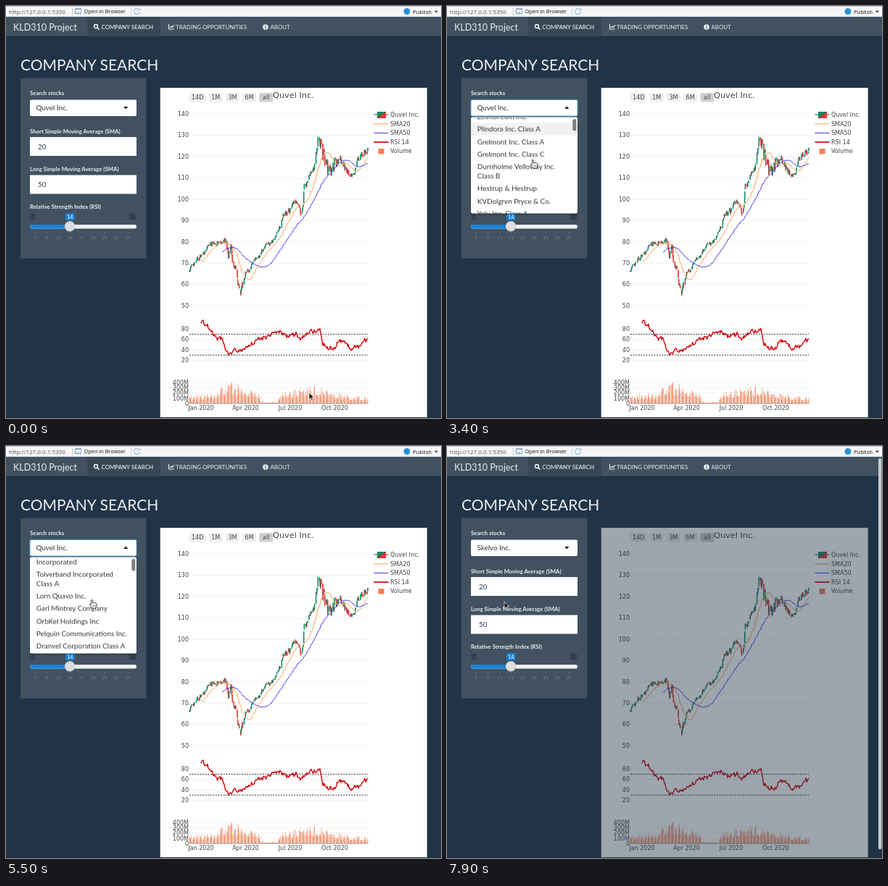
Write an HTML page that moves like this. It is 600x569 px and loops after 8 s.

```html
<!DOCTYPE html>
<html lang="en">
<head>
<meta charset="utf-8">
<title>Company search</title>
<style>
html, body { margin: 0; width: 100%; height: 100%; overflow: hidden; background: #213447; }
svg { display: block; width: 600px; height: 569px; }
text { font-family: Lato, sans-serif; white-space: pre; }
.bar text { font-family: "Open Sans", sans-serif; }
.chart text { font-family: "DejaVu Sans", sans-serif; fill: #444; }

.open, .shut, .before, .after, .arrow, .hand, .hover, .thumb, .chart, .page { animation: 8s step-end infinite; }
.open { animation-name: open; }
.shut { animation-name: shut; }
.before { animation-name: before; }
.after { animation-name: after; }
.arrow { animation-name: arrow; }
.hand { animation-name: hand; }
.hover { animation-name: hover; }
.thumb { animation-name: thumb; }
.page { animation-name: page; }
.chart { animation-name: recalc; }
.caret { animation: blink 1s step-end infinite; }
.list { animation: scroll 8s linear infinite; }
.pointer { animation: move 8s ease-in-out infinite; }

@keyframes open { 0%, 90%, 100% { opacity: 0 } 18.75% { opacity: 1 } }
@keyframes shut { 0%, 90%, 100% { opacity: 1 } 18.75% { opacity: 0 } }
@keyframes before { 0% { opacity: 1 } 90%, 100% { opacity: 0 } }
@keyframes after { 0% { opacity: 0 } 90%, 100% { opacity: 1 } }
@keyframes arrow { 0%, 93%, 100% { opacity: 1 } 16% { opacity: 0 } }
@keyframes hand { 0%, 93%, 100% { opacity: 0 } 16% { opacity: 1 } }
@keyframes thumb { 0%, 86%, 100% { opacity: 0 } 37.5% { opacity: 1 } }
@keyframes page { 0% { opacity: 0 } 96%, 100% { opacity: 1 } }
@keyframes recalc { 0%, 97.5% { opacity: 1 } 98.75%, 100% { opacity: .56 } }
@keyframes blink { 0%, 70%, 100% { opacity: 1 } 20% { opacity: 0 } }
@keyframes hover {
  0% { transform: translateY(0) }
  28.75% { transform: translateY(17.2px) }
  33.75% { transform: translateY(34.4px) }
  36.25% { transform: translateY(51.6px) }
  81.25% { transform: translateY(366.4px) }
  85%, 100% { transform: translateY(383.6px) }
}
@keyframes scroll {
  0%, 37% { transform: translateY(0) }
  48.75% { transform: translateY(-101.7px) }
  61.25% { transform: translateY(-183.8px) }
  78.75%, 100% { transform: translateY(-313.4px) }
}
@keyframes move {
  0%, 1% { transform: translate(418px, 534px) }
  11.25%, 12.5% { transform: translate(131px, 149px) }
  16.25%, 19% { transform: translate(130px, 143px) }
  25% { transform: translate(128px, 168px) }
  32.5% { transform: translate(126px, 185px) }
  37.5%, 80% { transform: translate(118.5px, 212px) }
  86%, 90% { transform: translate(118px, 233px) }
  97.5%, 100% { transform: translate(79px, 215px) }
}
</style>
</head>
<body>
<svg id="stage" viewBox="0 0 600 569" xmlns="http://www.w3.org/2000/svg"></svg>
<script>
const START = "Quvel Inc.", CHOICE = "Skelvo Inc.";
const STOCKS = [
  START, "Tarnovell Corporation", "Zelmor.com Inc.", "Plindora Inc. Class A",
  "Grelmont Inc. Class A", "Grelmont Inc. Class C", "Durnholme Velloway Inc.|Class B",
  "Hestrup & Hestrup", "KVDolgren Pryce & Co.", "Yelu Inc. Class A",
  "Wendrel & Fosk Company", "ZORELK Corporation", "BrinderWell Group|Incorporated",
  "Tolverband Incorporated|Class A", "Lorn Quavo Inc.", "Garl Mintrey Company",
  "OrbKel Holdings Inc", "Pelquin Communications Inc.", "Dranvel Corporation Class A",
  "Uveko Inc.", CHOICE, "Jorvane Inc.", "Bank of Tremoria Corp", "Krelm Corporation"
];

// Turning points as x, value; seeded noise fills in the daily detail
const PRICE = [253,67, 285,80, 302,80, 306,71, 311,74, 324,57, 335,66, 356,77, 369,80, 382,92,
  400,98, 406,93, 410,95, 411,106, 425,115, 434,132, 438,118, 450,109, 460,121, 475,110, 485,117, 499,123];
const RSI = [269,94, 277,89, 289,62, 298,60, 307,31, 315,43, 325,38, 342,57, 366,69, 378,75,
  386,67, 400,71, 407,58, 412,70, 433,79, 437,50, 452,41, 460,60, 475,43, 487,46, 499,61];
const VOLUME = [253,120, 290,150, 306,330, 350,150, 351,26, 375,26, 376,140, 412,260, 435,230, 470,130, 499,95];

let seed = 7;
const rand = () => {
  seed = (seed * 16807) % 2147483647;
  return seed / 2147483647;
};
// Noise that drifts back to zero
const drift = keep => {
  let v = 0;
  return amp => v = v * keep + (rand() - .5) * amp;
};
const at = (pts, x) => {
  for (let i = 2; i < pts.length; i += 2) {
    if (x <= pts[i]) {
      const k = (x - pts[i - 2]) / (pts[i] - pts[i - 2]);
      return pts[i - 1] + k * (pts[i + 1] - pts[i - 1]);
    }
  }
  return pts[pts.length - 1];
};
const esc = s => s.replace(/&/g, "&amp;");
const text = (x, y, size, str, fill = "#eceff1", more = "") =>
  `<text x="${x}" y="${y}" font-size="${size}" fill="${fill}" ${more}>${esc(str)}</text>`;
const rect = (x, y, w, h, fill, more = "") =>
  `<rect x="${x}" y="${y}" width="${w}" height="${h}" fill="${fill}" ${more}/>`;
const path = (d, stroke, width = 1, more = "") =>
  `<path d="${d}" fill="none" stroke="${stroke}" stroke-width="${width}" ${more}/>`;
const shape = (d, fill, more = "") => `<path d="${d}" fill="${fill}" ${more}/>`;
const group = (name, body, more = "") => `<g class="${name}" ${more}>${body}</g>`;
const line = pts => "M" + pts.map(p => p.map(n => n.toFixed(1))).join("L");
const bar = (x, top, bottom) => `M${x.toFixed(1)} ${top.toFixed(1)}V${bottom.toFixed(1)}`;
const MID = 'text-anchor="middle"', END = 'text-anchor="end"', BOLD = 'font-weight="700"';

function toolbar() {
  return group("bar",
    rect(0, 0, 600, 15, "#f5f6f7") + rect(0, 0, 600, 1, "#b9bcbf") + rect(0, 14, 600, 1, "#d4d8dc") +
    text(4, 10.5, 8, "http://127.0.0.1:5350", "#555") +
    path("M91.5 2V13M172.5 2V13", "#cfd3d6") +
    rect(95.5, 3.5, 8, 7, "#fff", 'stroke="#8d9aa8"') + rect(95, 3, 9, 2, "#8fb0d4") +
    path("M97 11L101 7.5", "#5b8fc7") +
    text(107.5, 10.3, 7.4, "Open in Browser", "#111") +
    path("M184 5.5A4 4 0 1 0 184.5 8.5", "#9fbdd6", 1.2) + path("M185 3V6H182", "#9fbdd6") +
    '<circle cx="553" cy="7.5" r="4.5" fill="#2b8fd6"/>' +
    text(561, 10.5, 7.6, "Publish", "#111") + shape("M591 6.5H596L593.5 9.5Z", "#444"));
}

function navbar() {
  return rect(0, 15, 600, 26.5, "#41515f") + rect(112, 15, 101, 26.5, "#384755") +
    text(10, 33.5, 12.5, "KLD310 Project") +
    '<circle cx="124" cy="28" r="2.5" fill="none" stroke="#fff" stroke-width="1.3"/>' +
    path("M126 30L128.5 32.5", "#fff", 1.5) +
    text(131.5, 31.8, 7.9, "COMPANY SEARCH", "#fff") +
    path("M224.5 25V32H232", "#eceff1", 1.1) + path("M226 30L228 28L229.5 29.5L232 26", "#eceff1", 1.2) +
    text(234, 31.8, 7.9, "TRADING OPPORTUNITIES") +
    '<circle cx="358" cy="29" r="3.8" fill="#eceff1"/>' + rect(357.4, 28.3, 1.3, 3, "#41515f") +
    rect(357.4, 26.3, 1.3, 1.3, "#41515f") +
    text(364.5, 31.8, 7.9, "ABOUT") +
    text(20, 89, 21, "COMPANY SEARCH");
}

function slider() {
  const dim = "#75828e", badge = "#394754", blue = "#1783d8";
  let out = rect(33, 286, 8, 10, badge, 'rx="1.5"') + text(37, 293.5, 6.6, "5", "#1f2b36", MID) +
    rect(169, 286, 11, 10, badge, 'rx="1.5"') + text(174.5, 293.5, 6.6, "30", "#1f2b36", MID) +
    rect(82, 286, 12.5, 10, blue, 'rx="1.5"') + text(88.2, 293.7, 7.2, "14", "#fff", MID) +
    rect(33, 302, 147, 5.5, "#f1f1f1", 'rx="2.7"') + rect(33, 302, 54, 5.5, blue, 'rx="2.7"');
  for (let v = 5; v <= 30; v++) {
    const x = (40.5 + (v - 5) * 5.32).toFixed(1), major = v % 3 == 2;
    out += rect(x, 311, .5, major ? 4 : 2, dim);
    if (major) out += text(x, 321.5, 6, String(v), dim, MID);
  }
  return out + '<circle cx="88" cy="304.3" r="7" fill="#dedede" stroke="#b5babf" stroke-width=".6"/>';
}

function panel() {
  const label = (y, s) => text(33, y, 7.75, s, "#eceff1", BOLD);
  const input = (y, v) => rect(33, y, 147, 26, "#fff") + text(44, y + 16.6, 9.9, v, "#2b3e50");
  return rect(20, 99.5, 173.5, 249, "#41515f") +
    label(123, "Search stocks") + rect(33, 129.5, 147, 22.5, "#fff", 'rx="2"') +
    group("before", text(41.5, 144.3, 9.9, START, "#333")) +
    group("after", text(41.5, 144.3, 9.9, CHOICE, "#333")) +
    group("shut", shape("M162 139H168.5L165.2 142.6Z", "#222")) +
    label(175.5, "Short Simple Moving Average (SMA)") + input(181, "20") +
    label(227.5, "Long Simple Moving Average (SMA)") + input(233.5, "50") +
    label(279.5, "Relative Strength Index (RSI)") + slider();
}

function dropdown() {
  let y = 157.5, rows = "";
  for (const name of STOCKS) {
    const parts = name.split("|");
    parts.forEach((part, i) => {
      rows += text(41.8, (y + 12.2 + i * 13.2).toFixed(1), 9.9, part, "#333");
    });
    y += 4 + parts.length * 13.2;
  }
  const hover = rect(33, 157.5, 147, 17.2, "#f2f2f2", 'class="hover"');
  return '<clipPath id="box"><rect x="33" y="154.3" width="147" height="132" rx="2"/></clipPath>' +
    group("open",
      rect(33, 129.5, 147, 22.5, "none", 'rx="2" stroke="#5ba3dc"') +
      shape("M162 142H168.5L165.2 138.4Z", "#222") +
      rect(85.6, 135, .8, 11.5, "#222", 'class="caret"') +
      rect(32.5, 154.5, 148, 134, "#000", 'rx="3" opacity=".22"') +
      rect(33, 153.5, 147, 133, "#fff", 'rx="2"') +
      group("", group("list", hover + rows), 'clip-path="url(#box)"') +
      group("thumb", rect(173.3, 156, 5, 16.5, "#7f7f7f", 'rx="2.5"')));
}

function chart() {
  const green = "#148a66", red = "#e23a35", orange = "#f7a04b", blue = "#3c35ea";
  const crimson = "#d0040c", coral = "#f47f55";
  const py = v => 149 + (140 - v) * 2.944;
  const ry = v => 446 + (80 - v) * .7217;
  const vy = v => 549 - v * .0735;
  let out = rect(212.7, 113, 368, 455, "#fff");

  let left = 253;
  for (const s of ["14D", "1M", "3M", "6M", "all"]) {
    const w = s == "14D" ? 22.5 : 19;
    out += rect(left, 120, w, 12.5, s == "all" ? "#d0d0d0" : "#eee", 'rx="2"') +
      text(left + w / 2, 129.2, 8, s, "#444", MID);
    left += w + 4.2;
  }
  out += text(368, 127, 11.3, START);

  const axis = (from, to, step, scale, unit = "") => {
    for (let v = from; v <= to; v += step) {
      const y = scale(v);
      out += path(`M253 ${y.toFixed(1)}H499`, "#e2e2e2", .8, 'stroke-dasharray="2 1.5"') +
        text(252, (y + 2.9).toFixed(1), 8, v ? v + unit : "0", "#444", END);
    }
  };
  axis(50, 140, 10, py);
  axis(20, 80, 20, ry);
  axis(0, 400, 100, vy, "M");
  ["Jan", "Apr", "Jul", "Oct"].forEach((m, i) => {
    out += text(269 + i * 61.5, 558, 8, m + " 2020", "#444", MID);
  });

  // Trading days: five bars, then a weekend gap
  const walk = drift(.65), wobble = drift(.5);
  let last = 67, bars = "", candles = "";
  const days = Array.from({ length: 262 }, (_, i) => {
    const x = 253 + (Math.floor(i / 5) * 7 + i % 5) * .674;
    const wild = (x > 302 && x < 333) || (x > 430 && x < 456);
    const close = at(PRICE, x) * (1 + walk(wild ? .08 : .03));
    const open = last + (close - last) * rand() * .5;
    const tail = close * (wild ? .014 : .006);
    const hue = close > open ? green : red;
    const top = Math.max(open, close), low = Math.min(open, close);
    // A jump over the weekend leaves a gap instead of a long body
    const base = top - low > close * .07 ? top - tail : low;
    candles += path(bar(x, py(top + tail * rand()), py(base - tail * rand())), hue, .8) +
      path(bar(x, py(top + tail * .3), py(base - tail * .3)), hue, 1.5);
    bars += bar(x, 549, vy(at(VOLUME, x) * (.55 + .8 * rand() ** 2)));
    last = close;
    return { x, close, rsi: at(RSI, x) + wobble(8) };
  });
  const sma = n => line(days.slice(n - 1).map((d, i) =>
    [d.x, py(days.slice(i, i + n).reduce((sum, e) => sum + e.close, 0) / n)]));
  const rsi = line(days.filter(d => d.x >= 269).map(d => [d.x, ry(d.rsi)]));

  out += path(bars, coral, .65) + path("M253 549H499", "#777", .6) + candles +
    path(sma(20), orange) + path(sma(50), blue) +
    path(`M253 ${ry(70)}H499M253 ${ry(30)}H499`, "#222", 1, 'stroke-dasharray="2 1.6"') +
    path(rsi, crimson, 1.4, 'stroke-linejoin="round"');

  ["", orange, blue, crimson].forEach((hue, i) => {
    if (hue) out += path(`M507.5 ${150.2 + i * 12.6}H527.5`, hue, hue == crimson ? 1.7 : 1);
  });
  [START, "SMA20", "SMA50", "RSI 14", "Volume"].forEach((s, i) => {
    out += text(530, 153 + i * 12.6, 8, s);
  });
  return group("chart", out +
    path("M507.5 150H513", green, 1.3) + path("M523 150H527.5", red, 1.3) +
    shape("M512 146H524L512 155Z", green) + shape("M524 146V155H512Z", red) +
    path("M512 155L524 146", "#333", .8) + rect(513.5, 197, 8, 7.5, coral));
}

function pointer() {
  const arrow = shape("M0 0V9.3L2.2 7.3L3.8 11L5.4 10.3L3.8 6.8H6.7Z", "#111",
    'stroke="#fff" stroke-width=".7" stroke-linejoin="round"');
  const hand = shape("M-1 1Q0 -.6 1 1V4.6L4.6 4.7Q6.8 5.2 6.6 7Q6.6 9.5 5.4 12H.3" +
    "Q-1.6 9.3 -3.2 7.4Q-3 5.8 -1 7.2Z", "#fff",
    'stroke="#222" stroke-width=".9" stroke-linejoin="round"') +
    path("M1.4 7.5V10M3 7.5V10M4.6 7.5V10", "#444", .6);
  return group("pointer", group("arrow", arrow) + group("hand", hand));
}

document.getElementById("stage").innerHTML =
  rect(0, 0, 600, 569, "#213447") + navbar() + panel() + chart() +
  rect(0, 568, 600, 1, "#1a2836") +
  group("page", rect(595, 17, 4.5, 540, "#c3cad0", 'rx="2.2"')) +
  toolbar() + dropdown() + pointer();
</script>
</body>
</html>
```
